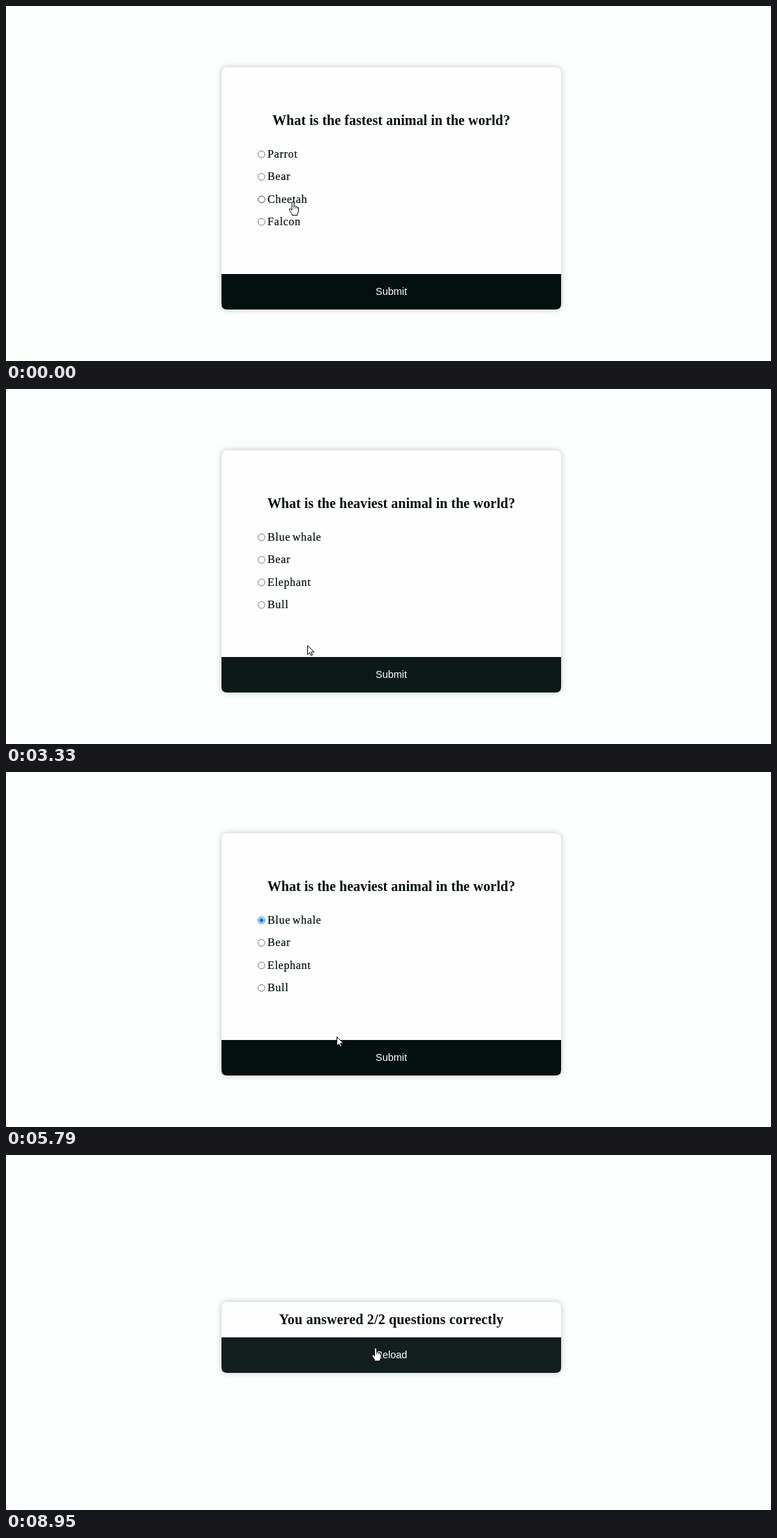
Animation, 1097 px wide and 510 px high, one loop 8970 ms. Source, as an HTML page:

```html
<!DOCTYPE html>
<html lang="en">
<head>
<meta charset="utf-8">
<title>Quiz</title>
<style>
  html, body { margin: 0; width: 100%; height: 100%; overflow: hidden; background: #fbfffe; }
  svg { display: block; }
  .card { fill: #fefefe; filter: drop-shadow(0 0 4px rgba(90, 90, 90, .38)); }
  .title { font: bold 20px "Liberation Serif", Times, serif; letter-spacing: .04px; text-anchor: middle; fill: #030f0e; }
  .result { letter-spacing: .17px; }
  .label { font: 16px "Liberation Serif", Times, serif; letter-spacing: .7px; word-spacing: -2px;
           fill: #030f0e; stroke: #030f0e; stroke-width: .2px; }
  .button { font: 14.4px "Liberation Sans", Arial, sans-serif; text-anchor: middle; fill: #fff; }
  .cursor { fill: #fff; stroke: #000; stroke-width: 1; stroke-linejoin: round; }
</style>
</head>
<body>
<svg width="1097" height="510" viewBox="0 0 1097 510">
  <rect id="card" class="card" x="309" width="487" rx="8"/>
  <path id="bar"/>
  <text id="title" x="552.5"></text>
  <g id="options"></g>
  <text id="action" class="button" x="552.5"></text>
  <g id="cursor" class="cursor">
    <path id="arrow" d="M.5.5V13.5L3.5 10.7 5.5 15 7.5 14.1 5.6 9.9H9.7Z"/>
    <g id="hand">
      <path d="M-1.4 2Q-1.4.5 0 .5T1.5 2V6.6Q3.4 5.6 4.2 7.3 5.9 6.4 6.5 8.3 8 7.9 8 10V13.5Q8 15.5 6.5 17.3V19.5H-1.5V17.6Q-3.6 14.8 -5.2 12 -5.3 9.8 -3.3 10.6L-1.4 12.4Z"/>
      <path d="M1.5 6.6V10M4.2 7.3V10.3M6.5 8.3V10.6" fill="none" stroke-width=".7"/>
    </g>
  </g>
</svg>
<script>
const LOOP = 8970, NEXT = 2000, DONE = 6300, FADE = 2000;
const $ = id => document.getElementById(id);

const quiz = [
  { title: "What is the fastest animal in the world?", labels: ["Parrot", "Bear", "Cheetah", "Falcon"],
    pick: 2, press: 410, check: 480 },
  { title: "What is the heaviest animal in the world?", labels: ["Blue whale", "Bear", "Elephant", "Bull"],
    pick: 0, press: 5130, check: 5220 }
];

// pointer stops: time, x, y
const stops = [
  [0, 411.5, 281], [770, 411.5, 281], [1600, 487, 409], [2350, 487, 409],
  [2800, 432, 368], [3350, 432, 368], [3900, 398, 286], [4080, 398, 286],
  [4360, 391, 252], [4400, 391, 252], [4820, 391, 216], [5380, 391, 216],
  [5790, 474, 380], [5890, 474, 380], [6050, 482, 400], [7180, 482, 400],
  [7181, 483, 400], [7380, 483, 400], [7590, 535, 318], [7740, 535, 318],
  [7940, 530, 276.5], [LOOP, 530, 276.5]
];

// button hover periods: enter, leave, end of visibility
const hovers = [[1370, 2600, 4600], [5930, DONE, DONE], [8270, LOOP, LOOP]];

const clamp = v => Math.max(0, Math.min(1, v));
const easeOut = t => 1 - (1 - clamp(t)) ** 2;
const rowY = i => 213 + i * 32.4;

function make(tag, attrs, parent) {
  const el = document.createElementNS("http://www.w3.org/2000/svg", tag);
  for (const key in attrs) el.setAttribute(key, attrs[key]);
  return parent.appendChild(el);
}

const rows = [0, 1, 2, 3].map(i => ({
  ring: make("circle", { cx: 366.3, cy: rowY(i), r: 4.9, fill: "#fff" }, $("options")),
  dot: make("circle", { cx: 366.3, cy: rowY(i), r: 3.1 }, $("options")),
  text: make("text", { x: 375, y: rowY(i) + 5, class: "label" }, $("options"))
}));

function pointer(t) {
  const i = stops.findIndex(s => s[0] > t);
  const [t0, x0, y0] = stops[i - 1], [t1, x1, y1] = stops[i];
  const u = (t - t0) / (t1 - t0), k = u * u * (3 - 2 * u);
  return [x0 + (x1 - x0) * k, y0 + (y1 - y0) * k];
}

function barColor(t) {
  const h = hovers.find(([enter, , end]) => t >= enter && t < end);
  let k = 0;
  if (h) k = easeOut((Math.min(t, h[1]) - h[0]) / FADE) * (1 - easeOut((t - h[1]) / FADE));
  return `rgb(${3 + 29 * k}, ${16 + 25 * k}, ${15 + 27 * k})`;
}

function drawOptions(q, t, x, y) {
  let over = false;
  rows.forEach(({ ring, dot, text }, i) => {
    text.textContent = q.labels[i];
    const hot = Math.abs(y - rowY(i)) < 9 && x > 361 && x < 375 + text.getComputedTextLength();
    const picked = i === q.pick;
    const checked = picked && t >= q.check;
    let color = hot ? "#4f4f4f" : "#767676";
    if (checked) color = hot ? "#005cc8" : "#0075ff";
    else if (picked && t >= q.press) color = "#8d8d8d";
    ring.setAttribute("stroke", color);
    dot.setAttribute("fill", checked ? color : "none");
    over ||= hot;
  });
  return over;
}

function draw(now) {
  const t = now % LOOP, done = t >= DONE;
  const [x, y] = pointer(t);
  const top = done ? 211 : 88, barY = done ? 262 : 385;

  $("card").setAttribute("y", top);
  $("card").setAttribute("height", barY + 51 - top);
  $("bar").setAttribute("d", `M309 ${barY}h487v43q0 8 -8 8h-471q-8 0 -8 -8z`);
  $("bar").setAttribute("fill", barColor(t));
  $("action").textContent = done ? "Reload" : "Submit";
  $("action").setAttribute("y", barY + 30);

  const q = quiz[t < NEXT ? 0 : 1];
  $("title").textContent = done ? "You answered 2/2 questions correctly" : q.title;
  $("title").setAttribute("class", done ? "title result" : "title");
  $("title").setAttribute("y", done ? 243 : 171);

  $("options").style.display = done ? "none" : "";
  const overLabel = !done && drawOptions(q, t, x, y);
  const active = overLabel || (y >= barY && y < barY + 51);
  $("hand").style.display = active ? "" : "none";
  $("arrow").style.display = active ? "none" : "";
  $("cursor").setAttribute("transform", `translate(${x} ${y})`);
}

const start = performance.now();
function tick() {
  draw(performance.now() - start);
  requestAnimationFrame(tick);
}
tick();
</script>
</body>
</html>
```
